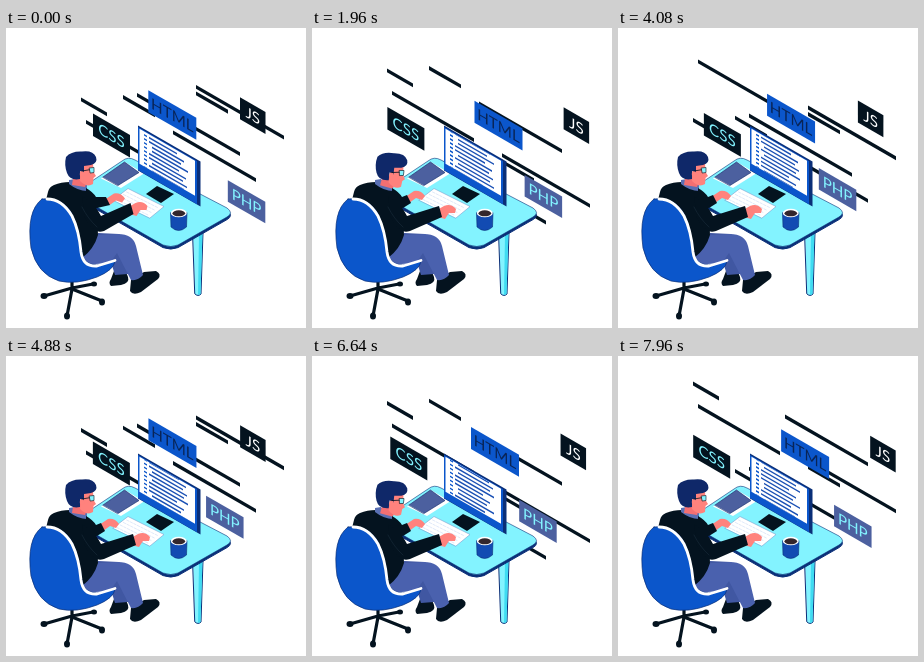
An HTML page with a canvas for the animation above (8 s loop, 300 by 300 pixels).

```html
<!DOCTYPE html>
<html lang="en">
<head>
<meta charset="utf-8">
<title>Developer at a desk</title>
<style>
html, body { margin: 0; width: 100%; height: 100%; overflow: hidden; background: #fff; }
canvas { display: block; width: 300px; height: 300px; }
</style>
</head>
<body>
<canvas id="stage"></canvas>
<script>
const canvas = document.getElementById('stage');
const ctx = canvas.getContext('2d');
const ratio = window.devicePixelRatio || 1;
canvas.width = canvas.height = 300 * ratio;

const LOOP = 8000, CYCLE = 5000, SLOPE = 0.577;
const INK = '#04131f', BLUE = '#0b56cb', NAVY = '#0f2869', SLATE = '#4c609f',
      CYAN = '#83f3ff', SKIN = '#ff827d', EDGE = '#0a2f78', WHITE = '#fff';

// Rising strokes: left x, width, y at cycle start, time of the jump to the bottom
const strokes = [
  [75, 26, 71, 3380],
  [117, 32, 68.7, 2340],
  [80, 82, 93.5, 4330],
  [131, 103, 66.5, 950],
  [167, 83, 104, 3380],
  [190, 88, 58.5, 440],
  [190, 32, 65, 440]
];

const mix = (a, b, p) => a + (b - a) * p;
const wave = p => (1 - Math.cos(Math.PI * p)) / 2;
const ramp = (t, a, b) => Math.min(1, Math.max(0, (t - a) / (b - a)));

function keyed(t, keys) {
  let i = 0;
  while (i < keys.length - 2 && t > keys[i + 1][0]) i++;
  const [t0, a] = keys[i], [t1, b] = keys[i + 1];
  return mix(a, b, wave(ramp(t, t0, t1)));
}

function shape(d, fill, stroke, width = 1) {
  const path = new Path2D(d);
  if (fill) { ctx.fillStyle = fill; ctx.fill(path); }
  if (stroke) {
    ctx.strokeStyle = stroke;
    ctx.lineWidth = width;
    ctx.stroke(path);
  }
}

function oval(x, y, rx, ry, fill) {
  ctx.beginPath();
  ctx.ellipse(x, y, rx, ry, 0, 0, Math.PI * 2);
  ctx.fillStyle = fill;
  ctx.fill();
}

// Runs a drawing on the slanted plane whose origin is x, y
function slanted(x, y, draw) {
  ctx.save();
  ctx.transform(1, SLOPE, 0, 1, x, y);
  draw();
  ctx.restore();
}

function box(x, y, w, h, fill) {
  ctx.fillStyle = fill;
  ctx.fillRect(x, y, w, h);
}

function drawStrokes(t) {
  const c = t % CYCLE;
  for (const [x, w, y, jump] of strokes) {
    const dy = c < jump ? -0.0148 * c : 0.0225 * (CYCLE - c);
    slanted(x, y + dy, () => box(0, -1.6, w, 3.8, INK));
  }
}

function tag(text, x, y, w, h, fill, color) {
  slanted(x, y, () => {
    box(0, 0, w, h, fill);
    ctx.fillStyle = color;
    ctx.font = '15.2px Lato, "Open Sans", sans-serif';
    ctx.textAlign = 'center';
    ctx.fillText(text, w / 2, h / 2 + 5.5);
  });
}

function drawTags(t) {
  const out = wave(t / CYCLE * 2);
  const css = keyed(t, [[0, 87], [1600, 75], [4700, 87], [7700, 75], [10800, 87]]);
  const php = 211 - 11 * Math.cos((t - 4700) / 10000 * Math.PI * 2);
  const html = mix(142.3, 165, out), js = mix(234, 253.8, out);
  tag('CSS', css, 85.6 + (css - 87) * SLOPE, 37, 22.5, INK, CYAN);
  tag('HTML', html, 62 + (html - 142) * 0.53, 48, 22, BLUE, '#092456');
  tag('JS', js, 69.2 + (js - 234) * SLOPE, 25.5, 22, INK, WHITE);
  tag('PHP', php, 152.3 + (php - 222) * SLOPE, 37.5, 21.5, SLATE, CYAN);
}

function drawTable() {
  shape('M187 207L197 204L195 266Q192 269 189 266Z', CYAN, EDGE, 1);
  shape('M193 207L196.5 204L194.5 266L192 267Z', '#3fdcf2');
  const top = 'M80 157L116 133Q122 128 129 132L221 180Q228 185 221 189L172 217Q165 220 157 217L82 174Z';
  ctx.save();
  ctx.translate(0, 2.6);
  shape(top, EDGE, EDGE, 1);
  ctx.restore();
  shape(top, CYAN, EDGE, 0.6);
}

function drawScreen(t) {
  box(0, 0, 62.5, 45, EDGE);
  box(0, 1.6, 59, 43, BLUE);
  box(1.5, 2.4, 55.5, 35, WHITE);
  ctx.beginPath();
  ctx.rect(1.5, 2.4, 55.5, 35);
  ctx.clip();
  const scroll = (t * 0.004) % 40;
  for (let i = 0; i < 20; i++) {
    const y = 5 + i * 4 - scroll, k = i % 10;
    const indent = [0, 0, 3, 3, 0, 0, 3, 0, 3, 0][k];
    box(6, y, 3, 1.6, BLUE);
    box(11 + indent, y, 28 + (k * 7) % 13, 1.6, '#1a50b4');
  }
}

function drawDesk(t) {
  // Tablet
  shape('M95 150.5L119 134L138 145.5L115 160Z', WHITE);
  shape('M97 149L118.5 134L133 144.5L112 157.5Z', SLATE, NAVY, 0.6);
  // Monitor
  shape('M140 166L151 158L168 166L155 175Z', INK);
  slanted(132, 97.5, () => drawScreen(t));
  // Keyboard
  shape('M107 172L122 160.5L158 178.5L144 190Z', WHITE, '#6f8cc4', 0.5);
  ctx.setLineDash([2.5, 1.5]);
  for (let i = 0; i < 4; i++) {
    const x = 111 + i * 3.2, y = 171.5 - i * 2.5;
    shape(`M${x} ${y}l31 15.5`, null, '#d8e4f8', 0.8);
  }
  ctx.setLineDash([]);
  // Mug
  shape('M164.5 185L165 199Q172.5 206 180.5 199L181 185Z', '#124bb2', EDGE, 0.6);
  oval(172.8, 185, 8, 4.3, WHITE);
  oval(172.8, 185.3, 6.3, 3, '#33262c');
}

function drawChairBase() {
  ctx.lineCap = 'round';
  shape('M66 250V262M66 260L38 268M66 260L87 256M66 261L96 273M66 261L61 288', null, INK, 3.2);
  oval(38, 268, 3.5, 3, INK);
  oval(96, 274, 3, 3.5, INK);
  oval(61, 288, 3, 3.5, INK);
  oval(88, 256, 3, 2.5, INK);
}

function drawLegs() {
  // Shoes
  shape('M108 243L118 239L122 249Q124 255 115 257L105 258Q102 255 105 251Z', INK);
  shape('M125 252L138 244L150 243Q156 246 152 251L135 264Q127 268 124 263Z', INK);
  // Trousers
  shape('M92 205L113 206Q122 212 123 231L122 246L109 247L104 231L88 236Z', '#4057a2');
  shape('M76 208L112 206Q127 206 130 218L137 247Q132 253 125 252L111 225L104 235L75 237Z', '#4a61ae');
}

function drawHead(t) {
  const c = t % CYCLE;
  const nod = wave(ramp(c, 1000, 1550)) * (1 - wave(ramp(c, 2100, 2650)));
  ctx.save();
  ctx.translate(72 + nod * 2.5, 153 + nod);
  ctx.rotate(nod * 0.12);
  ctx.translate(-73, -153);
  shape('M69 144L83 150L80 159L67 157Z', '#f36f72');
  shape('M76 136L88 135L88.5 144L91 148L88.5 150L88 156Q82 160 75 153Z', SKIN);
  shape('M61 129Q66 123 77 123.5Q88 122 91 129Q93 135 86 137L79 138L79 145L75 143L75 151Q65 153 62 145Q59 137 61 129Z', NAVY);
  oval(77, 146, 2.2, 3, SKIN);
  shape('M77 143L86 141.5', null, INK, 0.8);
  shape('M84.5 140L89 139.5L89 144.5L85.5 145Z', CYAN, INK, 0.6);
  ctx.restore();
}

function drawHands(t) {
  const c = t % CYCLE;
  // A short spell of typing at the start of each cycle
  const tap = c < 900 ? (1 + Math.cos(c / 300 * Math.PI * 2)) / 2 * (1 - ramp(c, 600, 900)) : 0;
  ctx.save();
  ctx.translate(tap * 6, tap * 2.5);
  shape('M93 169L102 163Q109 162 113 168L110 172L104 170L97 175Z', SKIN);
  ctx.restore();
  ctx.save();
  ctx.translate(-tap * 2.5, -tap * 3);
  shape('M125 182L132 178Q139 175 144 181L143 185L137 185L133 191L126 189Z', SKIN);
  ctx.restore();
  const x = 97 + tap * 5, y = 172 + tap * 2;
  shape(`M80 160Q87 164 90 169L${x - 2} ${y - 5}L${x + 2} ${y + 3}L91 180L80 178Z`, INK);
  const rx = 127 - tap * 2.5, ry = 184 - tap * 3;
  shape(`M76 168Q88 174 95 188L${rx} ${ry - 6}L${rx + 3} ${ry + 5}L98 203Q87 207 79 190Z`, INK);
}

function drawPerson(t) {
  drawChairBase();
  drawLegs();
  shape('M40 172L42 164Q43 159 48 157Q55 154 64 154L80 160Q88 169 91 184L92 207Q88 221 76 230L60 200Z', INK);
  shape('M63 152L69 151Q73 157 81 156L81 163Q72 163 63 156Z', '#5a70b4');
  drawHead(t);
  drawHands(t);
  shape('M76 179Q82 191 91 199', null, '#1a2d3b', 0.6);
  // Seat shell
  shape('M36 171Q54 168 65 184Q73 199 76 225Q78 237 91 237L109 233Q108 242 91 249Q70 257 53 253Q31 246 25 220Q20 183 36 171Z', BLUE, EDGE, 0.7);
  shape('M41 171Q56 171 66 188Q73 202 75 224Q77 239 91 238L109 232.5', null, WHITE, 2.8);
}

function frame(now) {
  const t = now % LOOP;
  ctx.setTransform(ratio, 0, 0, ratio, 0, 0);
  ctx.fillStyle = WHITE;
  ctx.fillRect(0, 0, 300, 300);
  ctx.lineJoin = 'round';
  drawStrokes(t);
  drawTags(t);
  drawTable();
  drawDesk(t);
  drawPerson(t);
}

const start = performance.now();
function tick() {
  frame(performance.now() - start);
  requestAnimationFrame(tick);
}
tick();
</script>
</body>
</html>
```
